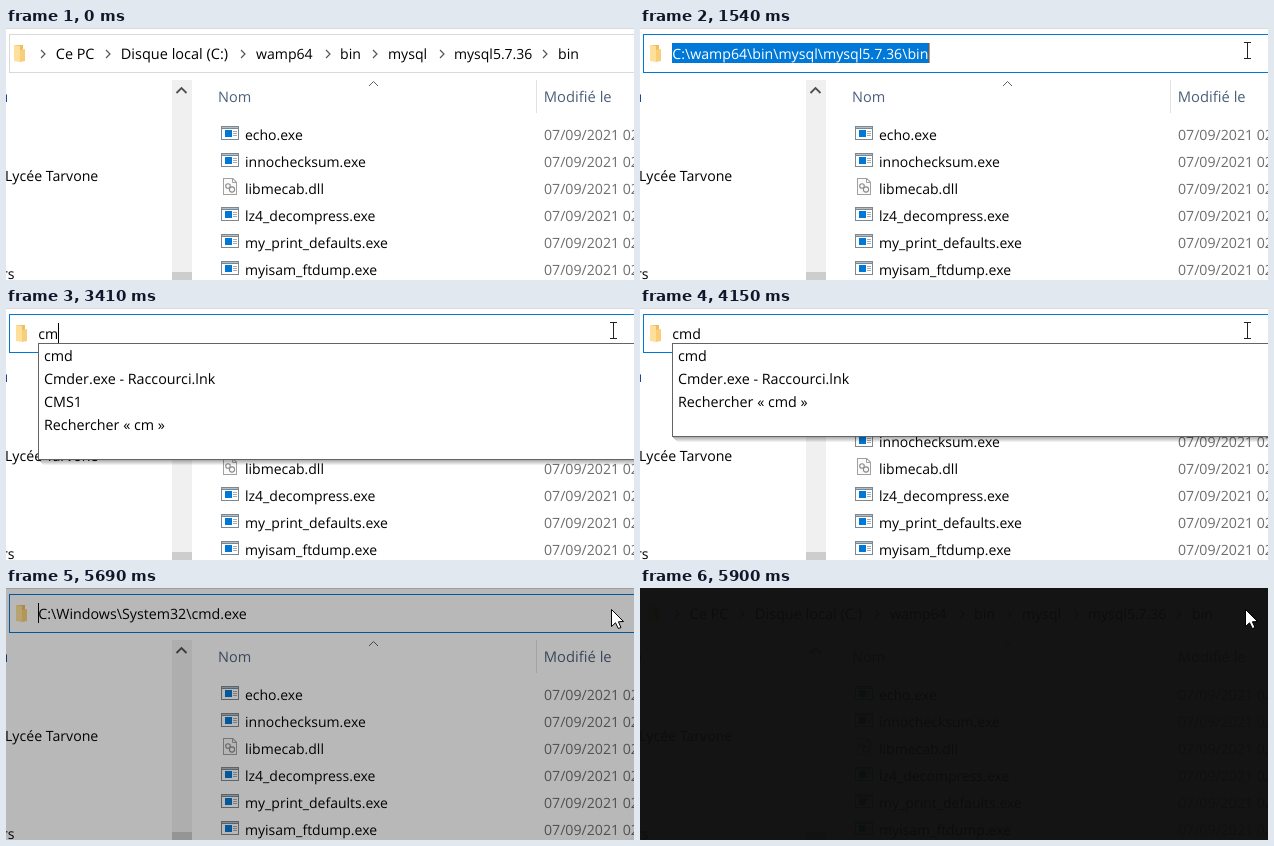
These frames come from a looping animation (628x252 px, 6750 ms). An HTML page with a canvas:

```html
<!DOCTYPE html>
<html lang="fr">
<head>
<meta charset="utf-8">
<title>Ouvrir cmd depuis la barre d'adresse</title>
<style>
html, body { margin: 0; width: 100%; height: 100%; overflow: hidden; background: #fff; }
canvas { display: block; }
</style>
</head>
<body>
<canvas id="stage" width="628" height="252"></canvas>
<script>
const W = 628, H = 252, LOOP = 6750;
const ctx = document.getElementById('stage').getContext('2d');
const BLUE = '#0078d7';

function rect(x, y, w, h, color) {
  ctx.fillStyle = color;
  ctx.fillRect(x, y, w, h);
}

function text(str, x, y, color = '#000', size = 14.15, align = 'left') {
  ctx.font = size + 'px "Open Sans", "Noto Sans", sans-serif';
  ctx.textAlign = align;
  ctx.fillStyle = color;
  ctx.fillText(str, x, y);
}

function line(points, color, width = 1) {
  ctx.beginPath();
  points.forEach(([x, y]) => ctx.lineTo(x, y));
  ctx.strokeStyle = color;
  ctx.lineWidth = width;
  ctx.stroke();
}

function shape(points, color) {
  ctx.beginPath();
  points.forEach(([x, y]) => ctx.lineTo(x, y));
  ctx.closePath();
  ctx.fillStyle = color;
  ctx.fill();
}

function folder(x) {
  rect(x, 17, 9, 16, '#eebf62');
  shape([[x, 17], [x + 6, 18], [x + 6, 34], [x, 33]], '#ffe09a');
  shape([[x + 6, 22], [x + 11, 21], [x + 11, 33], [x + 6, 34]], '#f8cf78');
}

function exeIcon(x, y) {
  rect(x, y, 18, 14, '#7d8790');
  rect(x + 1, y + 3, 16, 10, '#fff');
  rect(x + 1, y + 1, 16, 1, '#b4bcc4');
  rect(x + 4, y + 4, 7, 7, BLUE);
  for (let i = 0; i < 3; i++) rect(x + 12, y + 5 + i * 2, 4, 1, '#a3abb3');
}

function gear(x, y, r) {
  ctx.beginPath();
  ctx.arc(x, y, r, 0, Math.PI * 2);
  ctx.strokeStyle = '#8c8c8c';
  ctx.lineWidth = 1.1;
  ctx.stroke();
}

function dllIcon(x, y) {
  shape([[x, y], [x + 10, y], [x + 14, y + 4], [x + 14, y + 17], [x, y + 17]], '#a0a0a0');
  shape([[x + 1, y + 1], [x + 9.5, y + 1], [x + 13, y + 4.5], [x + 13, y + 16], [x + 1, y + 16]], '#fafafa');
  line([[x + 9.5, y + 1], [x + 9.5, y + 4.5], [x + 13, y + 4.5]], '#a0a0a0');
  gear(x + 5, y + 8, 2.3);
  gear(x + 9, y + 11.5, 2.6);
}

function sidebar() {
  text('u', 2.2, 74, '#1f3f8f', 14.15, 'right');
  text('Lycée Tarvone', -1, 153);
  text('ers', 8.5, 251, '#000', 14.15, 'right');
  rect(166, 52, 20, 200, '#f0f0f0');
  rect(166, 244, 20, 8, '#cdcdcd');
  line([[170.5, 65], [175.5, 60], [180.5, 65]], '#505050', 1.8);
}

const FILES = ['echo.exe', 'innochecksum.exe', 'libmecab.dll',
  'lz4_decompress.exe', 'my_print_defaults.exe', 'myisam_ftdump.exe'];

function fileList() {
  text('Nom', 212, 74, '#4c607a', 14.5);
  text('Modifié le', 537.8, 74, '#4c607a', 14.75);
  rect(530, 52, 1, 33, '#e2e2e2');
  line([[363, 58], [367.5, 53.5], [372, 58]], '#606060');
  FILES.forEach((name, i) => {
    const y = 112 + i * 27;
    if (name.endsWith('dll')) dllIcon(217, y - 16);
    else exeIcon(215, y - 14);
    text(name, 239, y, '#000', 14);
    text('07/09/2021 02:00', 538, y, '#6d6d6d', 14.15);
  });
}

const CRUMBS = [['Ce PC', 49.8, 14.4], ['Disque local (C:)', 114.8, 14.5], ['wamp64', 250, 14.1],
  ['bin', 334, 14.1], ['mysql', 382, 14.1], ['mysql5.7.36', 448, 14], ['bin', 552, 14.1]];
const ARROWS = [37, 102, 237, 322, 369, 436, 539];

function addressBox(color) {
  rect(3, 6, 640, 39, color);
  rect(4, 7, 640, 37, '#fff');
}

function breadcrumb() {
  addressBox('#d9d9d9');
  folder(8);
  CRUMBS.forEach(([name, x, size]) => text(name, x, 31, '#000', size));
  ARROWS.forEach(x => line([[x - 2, 22], [x + 2, 26], [x - 2, 30]], '#555', 1.2));
}

const caret = (x, color = '#000') => rect(x, 15, 1, 20, color);

function suggestions(typed, bottom) {
  const items = ['cmd', 'Cmder.exe - Raccourci.lnk'];
  if (typed !== 'cmd') items.push('CMS1');
  items.push('Rechercher « ' + typed + ' »');
  for (let i = 0; i < 5; i++) rect(33 + i, bottom + i, W, 1, `rgba(0,0,0,${0.3 - i * 0.06})`);
  rect(32, 35, W, bottom - 35, '#646464');
  rect(33, 36, W, bottom - 37, '#fff');
  items.forEach((item, i) => text(item, 38, 53 + i * 23, '#000', 14.3));
}

function editor(t) {
  addressBox(BLUE);
  folder(10);
  if (t < 3140) {
    rect(32, 15, 258, 20, BLUE);
    text('C:\\wamp64\\bin\\mysql\\mysql5.7.36\\bin', 32.3, 31, '#fff', 14.17);
    if (t < 2060 || t >= 2590) caret(289, '#ff8728');
  } else if (t < 5490) {
    const typed = t < 3340 ? 'c' : t < 3610 ? 'cm' : 'cmd';
    text(typed, 32.3, 31);
    if (t < 4150 || (t >= 4760 && t < 5220)) caret([39, 52, 61][typed.length - 1]);
    if (t >= 3680 && t < 5290) suggestions('cmd', 129);
    else if (t >= 3410 && t < 3680) suggestions('cm', 152);
    else if (t >= 3210 && t < 3410) suggestions('c', 253);
  } else {
    text('C:\\Windows\\System32\\cmd.exe', 32.3, 31, '#000', 14.24);
    caret(32);
  }
}

function arrow(x, y) {
  const outline = [[0, 0], [0, 17], [4, 13.3], [6.8, 19], [9.5, 18], [6.9, 12.3], [12, 12]];
  const points = outline.map(([dx, dy]) => [x + dx + 0.5, y + dy + 0.5]);
  shape(points, '#fff');
  line([...points, points[0]], '#000');
}

function beam(x, y) {
  rect(x, y - 8, 1, 17, '#222');
  for (const end of [y - 8, y + 8]) {
    rect(x - 3, end, 3, 1, '#222');
    rect(x + 1, end, 3, 1, '#222');
  }
}

function pointer(t) {
  if (t < 790) return;
  if (t >= 1540 && t < 5490) return beam(607, 22);
  const step = Math.min(9, Math.floor((t - 790) / 68.8));
  const p = t < 1540 ? step / 9 : 1;
  const e = 1 - (1 - p) ** 2;
  arrow(Math.round(430 + 175 * e), Math.round(-14 + 35 * e));
}

// Opening console: [start, opacity]
const FADE = [[5620, 0.07], [5690, 0.29], [5770, 0.71], [5830, 0.88], [5900, 0.967]];

function draw(t) {
  rect(0, 0, W, H, '#fff');
  rect(0, 0, W, 1, '#dadada');
  sidebar();
  fileList();
  if (t >= 1540 && t < 5770) editor(t);
  else breadcrumb();
  const fade = FADE.filter(([start]) => t >= start).pop();
  if (fade) rect(0, 0, W, H, `rgba(12,13,12,${fade[1]})`);
  pointer(t);
}

ctx.textRendering = 'geometricPrecision';
const begin = performance.now();
function tick() {
  draw((performance.now() - begin) % LOOP);
  requestAnimationFrame(tick);
}
tick();
</script>
</body>
</html>
```
